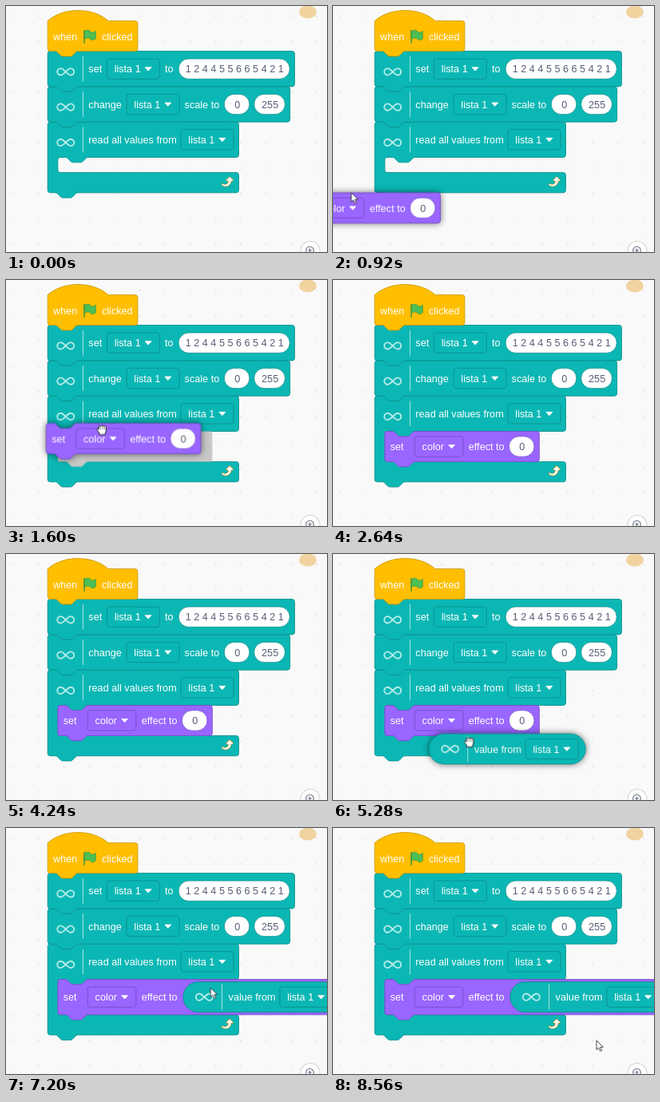
Animation of 402x308 px, one loop 8.64 s. Source, as an HTML page:

```html
<!DOCTYPE html>
<html lang="en">
<head>
<meta charset="utf-8">
<title>Block script</title>
<style>
  html, body { margin: 0; width: 100%; height: 100%; overflow: hidden; background: #f9f9f9; }
  svg { display: block; width: 402px; height: 308px; }
  text { font: 16px "Liberation Sans", Arial, sans-serif; white-space: pre; }
  .drag { filter: drop-shadow(0 0 4px rgba(0, 0, 0, .55)); }
</style>
</head>
<body>
<svg id="stage" viewBox="0 0 402 308"></svg>
<script>
const LOOP = 8640, SCALE = 0.791;
const LEFT = 52.2, TOP = 56.6, ROW = 56 * SCALE;
const MOUTH = { x: LEFT + 16 * SCALE, y: TOP + 3 * ROW };
const TEAL = { fill: '#0bb7b4', line: '#0b8e8c' };
const PURPLE = { fill: '#9966ff', line: '#774dcb' };
const GOLD = { fill: '#ffbf00', line: '#cc9900' };
const stage = document.getElementById('stage');

function add(parent, tag, attrs = {}, content) {
  const el = document.createElementNS('http://www.w3.org/2000/svg', tag);
  for (const key in attrs) el.setAttribute(key, attrs[key]);
  if (content !== undefined) el.textContent = content;
  parent.appendChild(el);
  return el;
}

// A group at a pixel position whose contents use block units.
const unitsAt = (parent, x, y) =>
  add(parent, 'g', { transform: `translate(${x} ${y}) scale(${SCALE})` });

// ---- block outlines ----
const NOTCH = 'c2 0 3 1 4 2l4 4c1 1 2 2 4 2h12c2 0 3-1 4-2l4-4c1-1 2-2 4-2';
const NOTCH_BACK = 'c-2 0-3 1-4 2l-4 4c-1 1-2 2-4 2h-12c-2 0-3-1-4-2l-4-4c-1-1-2-2-4-2';
const topEdge = w => `M0 4A4 4 0 0 1 4 0H12${NOTCH}H${w - 4}a4 4 0 0 1 4 4`;
const bottomEdge = `a4 4 0 0 1-4 4H48${NOTCH_BACK}H4a4 4 0 0 1-4-4z`;
const stackPath = (w, h) => `${topEdge(w)}V${h - 4}${bottomEdge}`;
const hatPath = (w, h) => `M0 0c25-22 71-22 96 0H${w - 4}a4 4 0 0 1 4 4V${h - 4}${bottomEdge}`;
const loopPath = (w, inner) => `${topEdge(w)}V52a4 4 0 0 1-4 4H64${NOTCH_BACK}H20a4 4 0 0 0-4 4` +
  `v${inner - 8}a4 4 0 0 0 4 4H${w - 4}a4 4 0 0 1 4 4v24${bottomEdge}`;

const shape = (g, d, color) =>
  add(g, 'path', { d, fill: color.fill, stroke: color.line, 'stroke-width': 1.1 });

// ---- block parts ----
const label = (g, x, cy, text, fill = '#fff') => add(g, 'text', { x: x + 0.7, y: cy + 5.8, fill }, text);

function pill(g, x, cy, w, text, color) {
  add(g, 'rect', { x, y: cy - 16, width: w, height: 32, rx: 16, fill: '#fff', stroke: color.line });
  label(g, x + w / 2, cy, text, '#575e75').setAttribute('text-anchor', 'middle');
}

function menu(g, x, cy, w, text, color) {
  add(g, 'rect', { x, y: cy - 16, width: w, height: 32, rx: 4, fill: color.fill, stroke: color.line, 'stroke-width': 1.1 });
  label(g, x + 11, cy, text);
  add(g, 'path', { d: `M${x + w - 23} ${cy - 2.5}h10l-5 5.5z`, fill: '#fff', stroke: '#fff', 'stroke-linejoin': 'round' });
}

const listMenu = (g, x, cy) => menu(g, x, cy, 83.4, 'lista 1', TEAL);

function infinity(g, cx, cy, barX, barY) {
  add(g, 'path', {
    d: 'M0 0C4-4 6-5.3 8-5.3A5.3 5.3 0 0 1 8 5.3C6 5.3 4 4 0 0S-6-5.3-8-5.3A5.3 5.3 0 0 0-8 5.3C-6 5.3-4 4 0 0Z',
    transform: `translate(${cx} ${cy})`, fill: 'none', stroke: '#b4ebe9', 'stroke-width': 2.4
  });
  add(g, 'path', { d: `M${barX} ${barY - 20}v40`, stroke: '#a4e3e1', 'stroke-width': 1.3 });
}

const listRow = g => infinity(g, 28.5, 32.5, 56, 28);

function loopBlock(inner) {
  const g = unitsAt(stage, LEFT, TOP + 2 * ROW);
  shape(g, loopPath(302.5, inner), TEAL);
  listRow(g);
  label(g, 64, 28, 'read all values from');
  listMenu(g, 211, 28);
  add(g, 'path', {
    d: 'M21.8 11h-2.6c0 1.5-.3 2.9-1 4.2-.8 1.6-2.1 2.8-3.7 3.6-1.5.8-3.3 1.1-4.9.8-1.6-.2-3.2-1-4.4-2.1-.8-.8.3-2 1.1-1.3 2 1.4 4.7 1.5 6.7.1 2-1.3 2.6-3.4 2.2-5.4h-2.4c-.7 0-.9-.7-.5-1.1l4.4-4.4c.3-.3.7-.3.9 0L22 9.8c.4.5.3 1.2-.2 1.2z',
    transform: `translate(271 ${inner + 58})`, fill: '#fff', stroke: '#cf8b17', 'stroke-width': 1.6, 'paint-order': 'stroke'
  });
  return g;
}

function effectBlock(parent, w, h) {
  shape(parent, stackPath(w, h), PURPLE);
  label(parent, 8, h / 2, 'set');
  menu(parent, 47.4, h / 2, 76.5, 'color', PURPLE);
  label(parent, 132, h / 2, 'effect to');
}

function plainEffect(parent) {
  effectBlock(parent, 244.6, 48);
  pill(parent, 196.6, 24, 40, '0', PURPLE);
}

function reporter(g) {
  add(g, 'rect', { width: 248, height: 48, rx: 24, fill: TEAL.fill, stroke: TEAL.line, 'stroke-width': 1.1 });
  infinity(g, 33.5, 24, 61.5, 24);
  label(g, 71, 24, 'value from');
  listMenu(g, 153, 24);
}

// ---- timing ----
const timing = { duration: LOOP, iterations: Infinity };

function move(el, stops) {
  const frames = stops.map(([t, x, y]) => ({ offset: t / LOOP, transform: `translate(${x}px, ${y}px)` }));
  const first = { ...frames[0], offset: 0 }, last = { ...frames.at(-1), offset: 1 };
  el.animate([first, ...frames, last], timing);
}

// Visible only within the given [from, to) spans.
function show(el, ...spans) {
  const inSpan = t => spans.some(([from, to]) => t >= from && t < to);
  const times = [...new Set([0, ...spans.flat(), LOOP])];
  el.animate(times.map(t => ({
    offset: t / LOOP, opacity: inSpan(Math.min(t, LOOP - 1)) ? 1 : 0, easing: 'step-end'
  })), timing);
}

// ---- workspace ----
const GRID = 40 * SCALE;
const dots = add(add(stage, 'defs'), 'pattern', {
  id: 'dots', x: 8.4, y: 12.2, width: GRID, height: GRID, patternUnits: 'userSpaceOnUse'
});
add(dots, 'rect', { width: 1.5, height: 1.5, fill: '#dadada' });
add(stage, 'rect', { width: 402, height: 308, fill: '#f9f9f9' });
add(stage, 'rect', { width: 402, height: 308, fill: 'url(#dots)' });
add(stage, 'ellipse', { cx: 378, cy: 7.5, rx: 11, ry: 8, fill: '#f1d3a0' });

const zoom = add(stage, 'g', { fill: 'none', stroke: '#6b7186', 'stroke-width': 1.1 });
add(zoom, 'circle', { cx: 381, cy: 306.5, r: 12, fill: '#fff', stroke: '#d4d4d4' });
add(zoom, 'circle', { cx: 380.5, cy: 306, r: 4.8 });
add(zoom, 'path', { d: 'M378 306h5M380.5 303.5v5' });

// ---- script ----
const loops = [24, 48, 56].map(loopBlock);
const scaleRow = unitsAt(stage, LEFT, TOP + ROW);
const setRow = unitsAt(stage, LEFT, TOP);
const hat = unitsAt(stage, LEFT, TOP - 48 * SCALE);

shape(hat, hatPath(142.5, 48), GOLD);
label(hat, 8, 25, 'when');
add(hat, 'path', {
  d: 'M58 17c5-4 8-2 10 0s5 2 8-1v12c-3 3-6 3-8 1s-5-3-10 0z',
  fill: '#4cbf56', stroke: '#45993d', 'stroke-linejoin': 'round'
});
add(hat, 'path', { d: 'M58 15v20', stroke: '#45993d', 'stroke-width': 2, 'stroke-linecap': 'round' });
label(hat, 85, 25, 'clicked');

shape(setRow, stackPath(391, 56), TEAL);
listRow(setRow);
label(setRow, 64, 28, 'set');
listMenu(setRow, 93.8, 28);
label(setRow, 185, 28, 'to');
pill(setRow, 207.2, 28, 176, '1 2 4 4 5 5 6 6 5 4 2 1', TEAL);

shape(scaleRow, stackPath(383.5, 56), TEAL);
listRow(scaleRow);
label(scaleRow, 64, 28, 'change');
listMenu(scaleRow, 125, 28);
label(scaleRow, 216, 28, 'scale to');
pill(scaleRow, 279.5, 28, 40, '0', TEAL);
pill(scaleRow, 326.8, 28, 49, '255', TEAL);

const SNAP = 1240, DROP = 1800, FILL = 6480;
show(loops[0], [0, SNAP]);
show(loops[1], [SNAP, FILL]);
show(loops[2], [FILL, LOOP]);

const marker = unitsAt(stage, MOUTH.x, MOUTH.y);
add(marker, 'path', { d: stackPath(244.6, 48), fill: '#c7c7c7' });
show(marker, [SNAP, DROP]);

const placed = unitsAt(stage, MOUTH.x, MOUTH.y);
plainEffect(placed);
show(placed, [DROP, FILL]);

const glow = unitsAt(stage, MOUTH.x, MOUTH.y);
add(glow, 'rect', { x: 194, y: 5.4, width: 45.2, height: 37.2, rx: 18.6, fill: 'none', stroke: '#fff', 'stroke-width': 4 });
show(glow, [5960, FILL]);

const filled = unitsAt(stage, MOUTH.x, MOUTH.y);
effectBlock(filled, 454, 56);
reporter(add(filled, 'g', { transform: 'translate(198.5 4)' }));
show(filled, [FILL, LOOP]);

// ---- dragged pieces ----
function dragged(draw, span, stops) {
  const g = add(stage, 'g', { class: 'drag' });
  draw(unitsAt(g, 0, 0));
  move(g, stops);
  show(g, span);
}

dragged(plainEffect, [480, DROP], [
  [480, -200, 258], [760, -120, 248], [920, -59.5, 234], [1120, 16, 202],
  [1320, 49, 181], [1600, 50.3, 179.5], [1780, 57, 184]
]);
dragged(reporter, [5160, FILL], [
  [5160, -90, 160], [5280, 120, 225], [5480, 150, 246], [5760, 180, 232],
  [6000, 195, 214], [6200, 196.6, 212], [6440, 203, 203]
]);

// ---- cursors ----
const arrow = add(stage, 'g');
add(arrow, 'path', {
  d: 'M0 0v11.6l2.7-2.5 1.9 4.2 2-.9-1.9-4.1h3.7z',
  fill: '#fff', stroke: '#333', 'stroke-width': .9, 'stroke-linejoin': 'round'
});
move(arrow, [
  [480, -70, 258], [760, -35, 248], [920, 22.5, 234], [1000, 50, 219],
  [7200, 256, 200], [7400, 290, 235], [7680, 330, 266]
]);
show(arrow, [480, 1000], [7200, LOOP]);

const hand = add(stage, 'g');
add(hand, 'path', {
  d: 'M-3.2 6V4L-5.8.5C-6.6-1-5-2-3.8-.6V-4c0-1.6 2-1.6 2.2-.2.2-1.7 2.3-1.7 2.5 0 .3-1.4 2.2-1.3 2.4.2.4-1.1 2-.8 2 .6V1L4.2 4v2z',
  fill: '#fff', stroke: '#222', 'stroke-width': 1, 'stroke-linejoin': 'round'
});
add(hand, 'path', { d: 'M-1.6-3.6v3M.9-3.6v3M3.3-3.4v3', stroke: '#444', 'stroke-width': .7 });
move(hand, [
  [1000, 54, 223], [1320, 118, 189], [1600, 120, 187.5], [1800, 127, 192],
  [2080, 127, 192], [2600, 82, 230], [5160, -30, 170], [5280, 170.5, 235.5],
  [5480, 208, 246], [5760, 240, 226], [6000, 255, 204], [6200, 256, 202.5], [6440, 261, 205]
]);
show(hand, [1000, 2600], [5160, 7200]);
</script>
</body>
</html>
```
